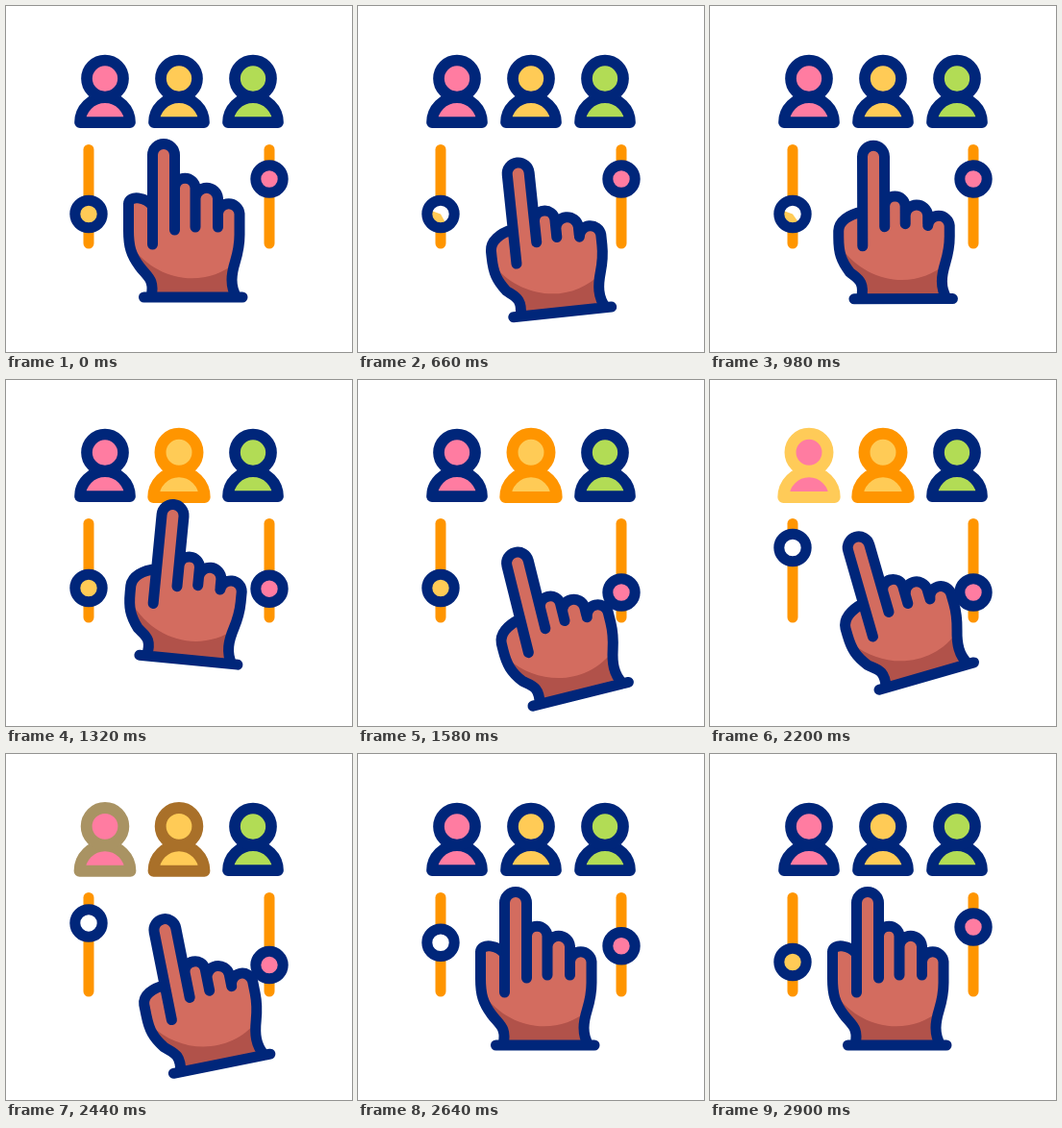
Animation, 360 px wide and 360 px high, one loop 3280 ms. Source, as an HTML page:

```html
<!DOCTYPE html>
<html lang="en">
<head>
<meta charset="utf-8">
<title>Choosing people</title>
<style>
  html, body { margin: 0; width: 100%; height: 100%; overflow: hidden; background: #fff; }
  svg { display: block; width: 100vw; height: 100vh; }
  .line { fill: none; stroke: #00267a; stroke-width: 11; stroke-linecap: round; stroke-linejoin: round; }
  .person { stroke-width: 11.7; stroke-linejoin: round; }
</style>
</head>
<body>
<svg id="stage" viewBox="0 0 360 360"></svg>
<script>
const LOOP = 3280, RESET = 2360;
const NAVY = [0, 38, 122], ORANGE = [255, 149, 0], YELLOW = [255, 203, 88];
const PINK = '#ff7ca1', GOLD = '#ffcb56', GREEN = '#b2dc55';

function set(el, attrs) {
  for (const k in attrs) el.setAttribute(k, attrs[k]);
  return el;
}
function add(parent, tag, attrs = {}) {
  const el = document.createElementNS('http://www.w3.org/2000/svg', tag);
  return parent.appendChild(set(el, attrs));
}

const mix = (a, b, u) => a + (b - a) * u;
const linear = (t, start, span) => Math.min(1, Math.max(0, (t - start) / span));
const ramp = (t, start, span) => (1 - Math.cos(Math.PI * linear(t, start, span))) / 2;

const stage = document.getElementById('stage');

const people = [
  { x: 103, fill: PINK, on: YELLOW, start: 1700 },
  { x: 180, fill: GOLD, on: ORANGE, start: 1060 },
  { x: 257, fill: GREEN }
];
for (const p of people) {
  p.el = add(stage, 'g', { class: 'person', fill: p.fill });
  add(p.el, 'path', { d: 'M-26 33A26 26 0 0 1 26 33Z' });
  add(p.el, 'circle', { cy: -12.7, r: 19 });
}

const sliders = [
  { x: 86, fill: GOLD, y0: 216.5, y1: 174.5, start: 1680, blinks: true },
  { x: 274, fill: PINK, y0: 180, y1: 221, start: 1064 }
];
for (const s of sliders) {
  add(stage, 'path', { d: `M${s.x} 149.5V247`, class: 'line' }).style.stroke = '#ff9500';
  s.el = add(stage, 'g');
  add(s.el, 'circle', { r: 14, fill: '#fff' });
  s.pie = add(s.el, 'circle', {
    r: 4.7, fill: 'none', stroke: s.fill, 'stroke-width': 9.4, pathLength: 100, transform: 'rotate(200)'
  });
  add(s.el, 'circle', { r: 14.2, class: 'line' });
}

const hand = add(stage, 'g');
const skin = add(hand, 'path', { fill: '#d36c5f' });
const shade = add(hand, 'path', { fill: '#b1524a' });
const outline = add(hand, 'path', { class: 'line' });

// Wrist position and angle
const REST = [194, 303, 0], AIM = [212, 318.5, -6], LOW = [231, 327, -14];
const MIDDLE = [189, 291, 5.6], LEFT = [203, 245.5, -23.1];
const MOVES = [[340, REST], [650, AIM], [1310, MIDDLE], [1585, LOW], [1860, LEFT], [RESET, LOW], [2640, REST]];

function handPose(t) {
  const i = MOVES.findIndex(m => t < m[0]);
  if (i < 1) return REST;
  const [t0, a] = MOVES[i - 1], [t1, b] = MOVES[i];
  return a.map((v, k) => mix(v, b[k], ramp(t, t0, t1 - t0)));
}

// Draws the hand from open (0) to three fingers folded (1)
function shapeHand(curl) {
  const [f2, f3, f4] = [[189, 206], [200, 216], [216, 227]].map(([a, b]) => mix(a, b, curl));
  const knuckle = mix(208, 212, curl), thumb = mix(206, 232, curl), palm = mix(234, 239, curl);
  const low = mix(271, 275, curl), crease = mix(0, -5, curl);
  const index = 'V155A11.5 11.5 0 0 1 175.5 155V';
  const arc2 = `${f2}A10.8 10.8 0 0 1 197 ${f2}V`;
  const arc3 = `${f3}A11.8 11.8 0 0 1 220.5 ${f3}V`;
  const right = 'C243 262 235 268 235 285Q235 295 240 303';
  const arc4 = `${f4}A11.3 11.3 0 0 1 243 ${f4}V238${right}`;
  const left = `M151 303C155 284 147 282 139 ${low}C130 ${low - 12} 127.5 ${palm + 16} 127.5 ${palm}
    V${thumb}C128 ${thumb - 10} ${mix(146, 138, curl)} ${mix(199, 215, curl)} 152.5 ${knuckle}`;

  set(skin, { d: `${left}${index}${arc2}${arc3}${arc4}Z` });
  set(shade, {
    d: `M130 249C155 285 205 296 240 266Q235 274 235 285Q235 295 240 303
      H151C155 284 147 282 139 ${low}Q132 ${low - 10} 130 249Z`
  });
  set(outline, {
    d: `${left}M152.5 248${index}${233 + crease}M175.5 ${arc2}${230 + crease}
      M197 ${arc3}${230 + crease}M220.5 ${arc4}M143.5 303H246`
  });
}

function drawPerson(p, t) {
  const u = p.on ? linear(t, p.start, 240) - linear(t, RESET, 240) : 0;
  const dip = p.on && t < RESET ? 0.09 * Math.sin(Math.PI * u) : 0;
  const from = NAVY, to = p.on || NAVY;
  set(p.el, {
    transform: `translate(${p.x} 88.2) scale(${1 + 0.025 * u - dip})`,
    stroke: `rgb(${from.map((c, i) => Math.round(mix(c, to[i], u)))})`
  });
}

function drawSlider(s, t) {
  const u = ramp(t, s.start, 320) - ramp(t, 2380, 510);
  const full = s.blinks
    ? 1 - linear(t, 440, 360) + linear(t, 860, 300) - linear(t, 1960, 220) + linear(t, 2680, 220)
    : 1;
  set(s.el, { transform: `translate(${s.x} ${mix(s.y0, s.y1, u)})` });
  set(s.pie, {
    'stroke-dasharray': `${full * 100} 200`,
    'stroke-dashoffset': (full - 1) * 100,
    visibility: full > 0.001 ? 'visible' : 'hidden'
  });
}

function draw(t) {
  people.forEach(p => drawPerson(p, t));
  sliders.forEach(s => drawSlider(s, t));
  const [x, y, angle] = handPose(t);
  shapeHand(ramp(t, 340, 280) - ramp(t, RESET, 280));
  set(hand, { transform: `translate(${x} ${y}) rotate(${angle}) translate(-194 -303)` });
}

const begin = performance.now();
function tick() {
  draw((performance.now() - begin) % LOOP);
  requestAnimationFrame(tick);
}
tick();
</script>
</body>
</html>
```
